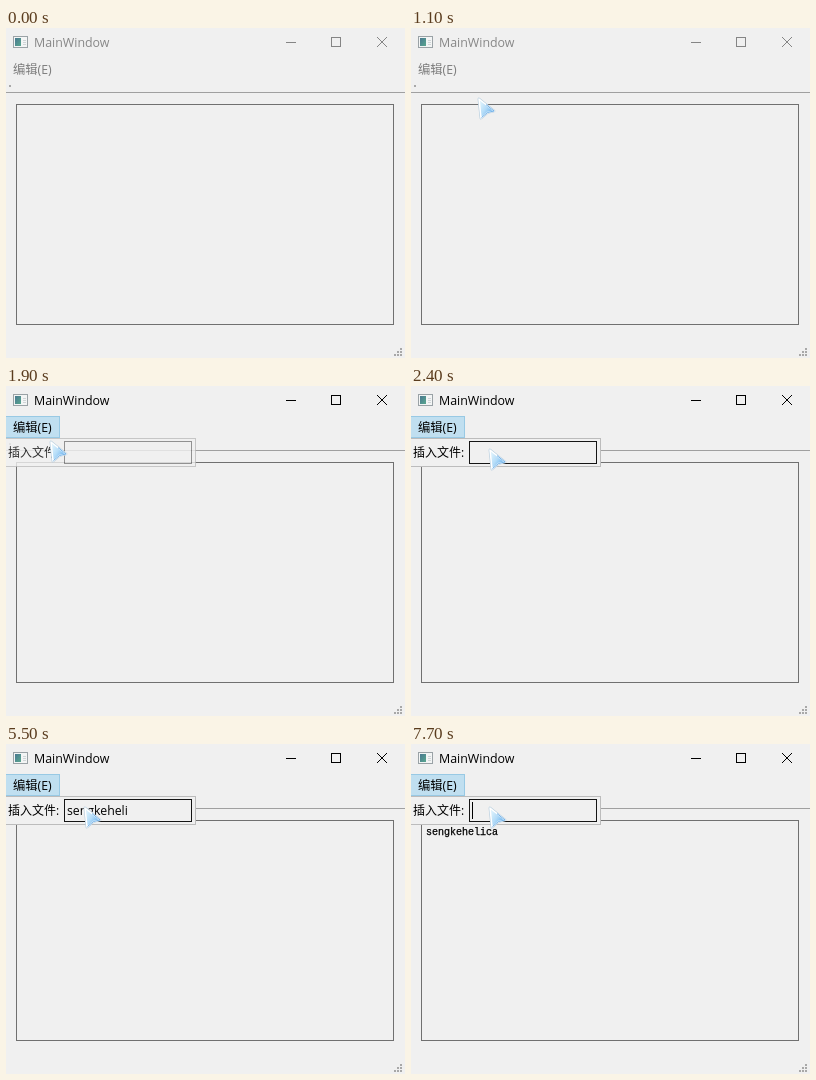
An HTML page for the animation above (8000 ms loop, 399 px wide and 330 px high).

```html
<!DOCTYPE html>
<html lang="zh-CN">
<head>
<meta charset="utf-8">
<title>MainWindow</title>
<style>
  html, body { margin: 0; width: 100%; height: 100%; overflow: hidden; background: #f0f0f0; }
  svg { display: block; width: 399px; height: 330px; }
  text { font: 12.3px "Open Sans", "Noto Sans CJK SC", "Noto Sans CJK", sans-serif; white-space: pre; }
  #output { font: 10px "Liberation Mono", monospace; stroke: #000; stroke-width: .25; }
</style>
</head>
<body>
<svg viewBox="0 0 399 330" xmlns="http://www.w3.org/2000/svg">
  <defs>
    <linearGradient id="glass" x1="0.1" y1="0.2" x2="0.8" y2="0.8">
      <stop offset="0" stop-color="#dcf1fc"/>
      <stop offset="0.5" stop-color="#b4dcf8"/>
      <stop offset="1" stop-color="#6db4ee"/>
    </linearGradient>
    <linearGradient id="pane" x1="0" y1="0" x2="1" y2="1">
      <stop offset="0" stop-color="#4a7890"/>
      <stop offset="1" stop-color="#58a78f"/>
    </linearGradient>
    <path id="arrow" d="M1 1L16 13L9.5 14.5L3 20Z" stroke-linejoin="round"/>
  </defs>
  <rect width="399" height="330" fill="#f0f0f0"/>

  <g id="icon">
    <rect x="7.5" y="8.5" width="14" height="11" fill="#f3f5f5" stroke="#9aa2a6"/>
    <rect x="9" y="10" width="6" height="8" fill="url(#pane)"/>
    <path d="M17 12.5H20M17 14.5H20M17 16.5H20" stroke="#cfd5d7"/>
  </g>
  <text id="title" x="28" y="19" style="font-size:12.4px">MainWindow</text>
  <g id="controls" fill="none">
    <path d="M280 14.5H290"/>
    <rect x="325.5" y="9.5" width="9" height="9"/>
    <path d="M371 9L381 19M381 9L371 19"/>
  </g>

  <rect id="menuBack" x="-0.5" y="30.5" width="54" height="21"/>
  <text id="menuText" x="7" y="46">编辑(E)</text>

  <rect x="3" y="57" width="2" height="2" fill="#a8a8a8"/>
  <path d="M0 64.5H399" stroke="#a0a0a0"/>
  <rect x="10.5" y="76.5" width="377" height="220" fill="none" stroke="#707070"/>
  <text id="output" x="15" y="91"></text>
  <g id="grip" fill="#a8a8a8"></g>

  <g id="popup">
    <rect x="-0.5" y="52.5" width="190" height="28" fill="#f0f0f0" stroke="#bcbcbc"/>
    <text x="2" y="71" style="font-size:12px">插入文件:</text>
    <rect id="field" x="58.5" y="55.5" width="127" height="22" fill="#f0f0f0"/>
    <text id="input" x="61" y="71"></text>
    <rect id="caret" y="58" width="1" height="17"/>
  </g>

  <g id="pointer">
    <use href="#arrow" fill="none" stroke="#b9cfdf" stroke-width="2.8"/>
    <use href="#arrow" fill="url(#glass)" stroke="#fff" stroke-width="1.5"/>
    <path d="M3.5 19.5L9.5 14.5L16 13L8 6.6" fill="none" stroke="#6fb0e8"/>
  </g>
</svg>
<script>
const LOOP = 8000, STEP = 100, KEY_GAP = 75, BLINK = 600;
const ACTIVATE = 1600, OPEN = 1800, FOCUS = 2700, SUBMIT = 6800;

const ui = {};
for (const el of document.querySelectorAll("[id]")) ui[el.id] = el;

// pointer stops: time, x, y
const stops = [[100, 13, 104], [600, 100, 97], [1600, 33, 43], [2000, 46, 57], [2400, 78, 63]];
// bursts of typing by start time
const bursts = { 3800: "s", 4300: "engke", 4800: "hel", 5400: "i", 6200: "ca " };
const word = Object.values(bursts).join("").trim();
// moments the caret blinks off
const blinks = [3300, 5500, 7100];

const clamp = u => Math.min(1, Math.max(0, u));
const smooth = u => u * u * (3 - 2 * u);

function tipAt(t) {
  let [, x, y] = stops[0];
  for (let i = 1; i < stops.length; i++) {
    const [t0, x0, y0] = stops[i - 1], [t1, x1, y1] = stops[i];
    const u = smooth(clamp((t - t0) / (t1 - t0)));
    x += (x1 - x0) * u;
    y += (y1 - y0) * u;
  }
  return [Math.round(x), Math.round(y)];
}

function typedAt(t) {
  if (t >= SUBMIT) return "";
  return Object.entries(bursts)
    .map(([at, keys]) => keys.slice(0, Math.max(0, Math.floor((t - at) / KEY_GAP) + 1)))
    .join("");
}

function caretAt(t) {
  const off = blinks.find(b => t >= b && t < b + BLINK);
  return t >= FOCUS && !(off && typedAt(t) === typedAt(off));
}

function set(el, attrs) {
  for (const name in attrs) el.setAttribute(name, attrs[name]);
}

const show = (el, on) => set(el, { visibility: on ? "visible" : "hidden" });

for (let row = 0; row < 3; row++)
  for (let col = 0; col <= row; col++) {
    const dot = document.createElementNS("http://www.w3.org/2000/svg", "rect");
    set(dot, { x: 394 - col * 3, y: 320 + row * 3, width: 2, height: 2 });
    ui.grip.append(dot);
  }

function draw(t) {
  const active = t >= ACTIVATE, open = t >= OPEN;
  const [x, y] = tipAt(t);

  set(ui.title, { fill: active ? "#000" : "#878787" });
  set(ui.controls, { stroke: active ? "#000" : "#858585" });
  set(ui.menuText, { fill: open ? "#000" : "#7c7c7c" });
  set(ui.menuBack, { fill: open ? "#c0dff0" : "#dff0f2", stroke: open ? "#98c9e4" : "#c5e4ee" });
  show(ui.menuBack, open || t > 600 && y < 52 && x < 54);

  set(ui.popup, { opacity: open ? clamp(0.4 + (t - OPEN) / 250) : 0 });
  set(ui.field, { stroke: x < 50 ? "#7a7a7a" : "#151515" });
  ui.input.textContent = typedAt(t);
  set(ui.caret, { x: 61 + Math.round(ui.input.getComputedTextLength()) });
  show(ui.caret, caretAt(t));
  ui.output.textContent = t >= SUBMIT ? word : "";

  set(ui.pointer, { transform: `translate(${x} ${y})` });
  show(ui.pointer, t >= 100);
}

const start = performance.now();
function tick() {
  const t = (performance.now() - start) % LOOP;
  draw(Math.floor(t / STEP) * STEP);
  requestAnimationFrame(tick);
}
tick();
</script>
</body>
</html>
```
